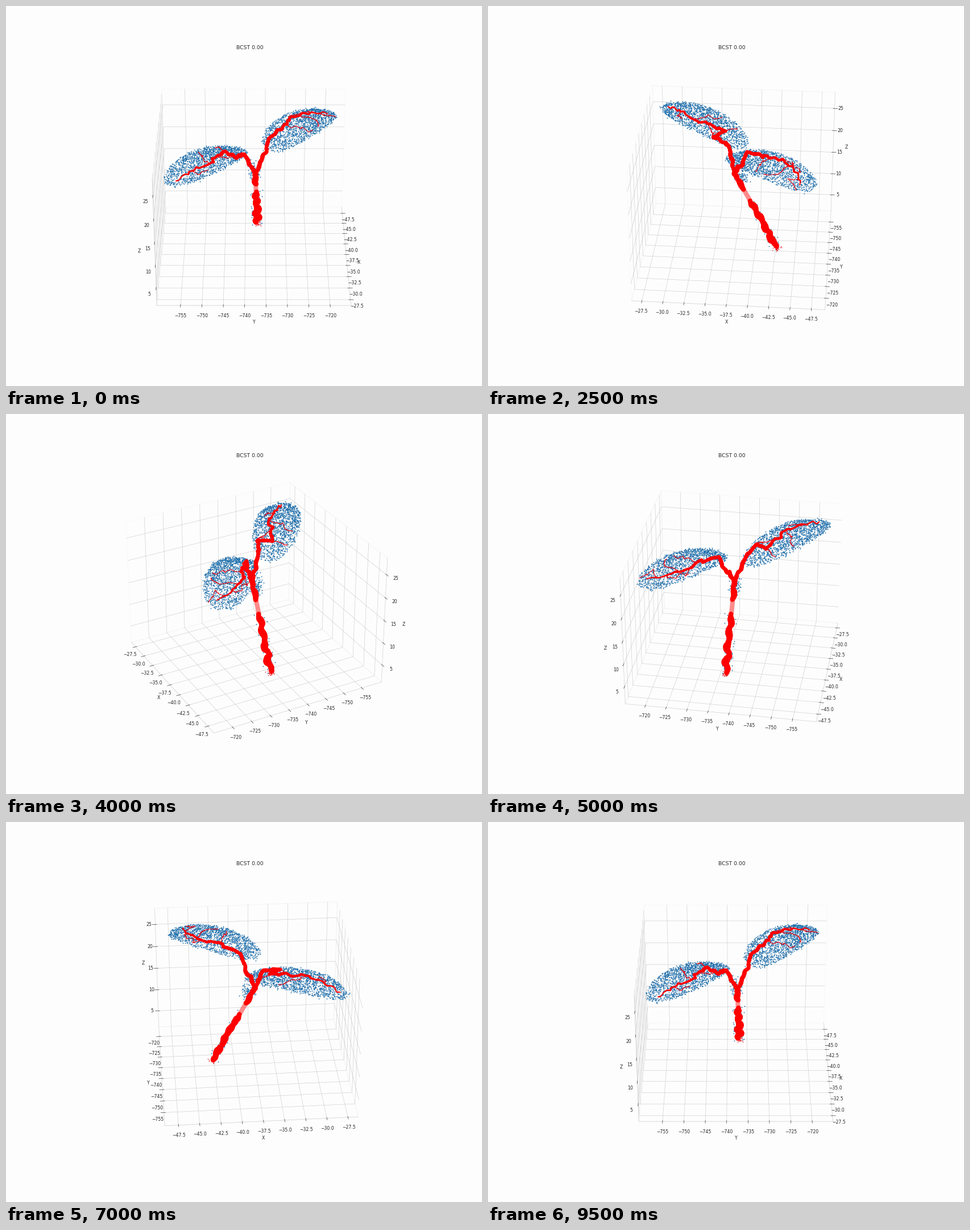
A matplotlib script that plays this animation: 837x669 px, repeating every 10000 ms.

```python
import numpy as np
import matplotlib.pyplot as plt
from matplotlib.animation import FuncAnimation

WIDTH, HEIGHT, DPI = 837, 669, 55.8
FRAMES, INTERVAL = 20, 500
BACKGROUND = "#fdfdfd"
EPS = 1e-6  # keeps the pixel size from rounding down

# Plot box; shapes are modelled in centred box units and mapped to data.
LOW = np.array([-49.10, -760.56, 1.13])
HIGH = np.array([-26.28, -715.13, 28.59])
BOX = np.array([4, 4, 3]) * 0.29762

HUB = np.array([0.007, 0.010, 0.152])
FOOT = np.array([-0.266, 0.019, -0.375])
GAP = 0.21, 0.36  # bare stretch, as fractions of the stem

plt.rcParams.update({
    "font.family": "DejaVu Sans",
    "text.color": "0.15",
    "axes.labelcolor": "0.15",
    "axes.edgecolor": "0.8",
    "grid.color": "0.8",
    "xtick.color": "0.15",
    "ytick.color": "0.15",
})

rng = np.random.default_rng(7)


def to_data(points):
    return (LOW + HIGH) / 2 + np.asarray(points) * (HIGH - LOW) / BOX


def scatter_area(diameter):
    """Scatter size for a diameter in pixels."""
    return (np.asarray(diameter) * 72 / DPI) ** 2


def resample(points, step):
    """Even samples along a polyline."""
    points = np.asarray(points, float)
    lengths = np.linalg.norm(np.diff(points, axis=0), axis=1)
    s = np.r_[0, np.cumsum(lengths)]
    t = np.linspace(0, s[-1], int(s[-1] / step) + 2)
    return np.stack([np.interp(t, s, c) for c in points.T], axis=1)


def rough(line, every, amount):
    """Add jagged random offsets that vanish at both ends."""
    knots = max(4, len(line) // every)
    offsets = rng.normal(0, amount, (knots, 3))
    offsets[[0, -1]] = 0
    t = np.linspace(0, knots - 1, len(line))
    return line + np.stack([np.interp(t, range(knots), c) for c in offsets.T], axis=1)


class Leaf:
    """Shallow dome over an ellipse; p runs from base to tip, q across."""

    def __init__(self, centre, length, width, heading, height, rise, rib):
        angle = np.radians(heading)
        self.centre = np.array(centre)
        self.along = length * np.array([np.cos(angle), np.sin(angle)])
        self.across = width * np.array([abs(np.sin(angle)), abs(np.cos(angle))])
        self.height, self.rise = height, rise
        self.rib = np.array(rib)

    def at(self, pq):
        p, q = np.transpose(pq)
        flat = self.centre + np.outer(p, self.along) + np.outer(q, self.across)
        w = self.height + self.rise * p - 0.055 * p**2 - 0.012 * q**2
        return np.column_stack([flat, w])

    def cloud(self, count):
        radius = np.sqrt(rng.uniform(0, 1, count))
        angle = rng.uniform(0, 2 * np.pi, count)
        points = self.at(np.column_stack([radius * np.cos(angle),
                                          radius * np.sin(angle)]))
        return points + rng.normal(0, 0.005, points.shape)

    def main_rib(self):
        """Stalk and midrib, thinning from the hub to the tip."""
        path = np.vstack([HUB, self.at(resample(self.rib, 0.05))])
        line = rough(resample(path, 0.004), 6, 0.006)
        return line, 7.5 - 5.5 * np.linspace(0, 1, len(line)) ** 1.4

    def side_veins(self, count):
        """Thin branches leaving the midrib on alternating sides."""
        rib = resample(self.rib, 0.02)
        for k in range(count):
            start = rib[int(len(rib) * (k + 2) / (count + 2)) - 1]
            end = np.array([start[0] + rng.uniform(-0.3, 0.2),
                            0.75 * (-1) ** k * np.sqrt(1 - start[0] ** 2)])
            bend = (start + end) / 2 + rng.normal(0, 0.12, 2)
            yield rough(resample(self.at([start, bend, end]), 0.0035), 7, 0.007)


right_leaf = Leaf((-0.235, 0.287), 0.334, 0.156, 142.8, 0.386, 0.003,
                  [(-.71, -.35), (-.23, -.32), (.08, -.54), (.59, -.14), (.78, .25)])
left_leaf = Leaf((0.230, -0.290), 0.356, 0.145, -37.4, 0.380, 0.030,
                 [(-.78, .45), (-.47, .70), (-.52, 0), (.08, .40), (.85, .10)])
leaves = right_leaf, left_leaf


def stem_at(t):
    return HUB + np.outer(t, FOOT - HUB)


def stem_piece(start, end):
    """Knotty stretch of stem with swellings, tapering at the foot."""
    t = np.arange(start, end, 0.006)
    line = stem_at(t)
    line[:, 1] += 0.011 * np.sin(12 * np.pi * t) * t
    diameter = 9 + 2.5 * t + 1.6 * np.cos(14 * np.pi * (t - 0.71))
    return rough(line, 5, 0.004), diameter * np.clip((1.06 - t) / 0.12, 0.5, 1)


def dots(ax, points, diameter, color, zorder):
    ax.scatter(*to_data(points).T, s=scatter_area(diameter), c=color, linewidths=0,
               depthshade=False, zorder=zorder)


pieces = [stem_piece(0, GAP[0]), stem_piece(GAP[1], 1)]
pieces += [leaf.main_rib() for leaf in leaves]
neck = rng.normal((-.035, 0, .14), (.02, .02, .035), (90, 3))
fringe = stem_at(rng.uniform(GAP[1], 1, 70)) + rng.normal(0, 0.016, (70, 3))
foot_specks = FOOT + rng.normal(0, 0.013, (30, 3))
cloud = np.vstack([leaf.cloud(1600) for leaf in leaves] + [neck, fringe])
specks = np.vstack([vein for leaf in leaves for vein in leaf.side_veins(5)]
                   + [foot_specks])

fig = plt.figure(figsize=((WIDTH + EPS) / DPI, (HEIGHT + EPS) / DPI), dpi=DPI,
                 facecolor=BACKGROUND)
ax = fig.add_subplot(projection="3d", computed_zorder=False, facecolor=BACKGROUND)

dots(ax, cloud, 1.8, "#1f6fab", 2)
dots(ax, specks, 1.5, "#e0101c", 3)
ax.plot(*to_data(stem_at(GAP)).T, color="red", alpha=0.45, lw=8 * 72 / DPI,
        solid_capstyle="round", zorder=4)
for line, diameter in pieces:
    dots(ax, line, diameter * rng.uniform(0.82, 1.1, len(line)), "red", 5)

ax.set(xlim=(LOW[0], HIGH[0]), ylim=(LOW[1], HIGH[1]), zlim=(LOW[2], HIGH[2]),
       yticks=range(-755, -715, 5),
       xlabel="X", ylabel="Y", zlabel="Z", title="BCST 0.00")
for axis in (ax.xaxis, ax.yaxis, ax.zaxis):
    axis.pane.fill = False


def update(i):
    # The tiny offset keeps the side panes well defined at a frontal view.
    ax.view_init(elev=30, azim=0.01 + 360 * i / (FRAMES - 1))
    return []


anim = FuncAnimation(fig, update, frames=FRAMES, init_func=lambda: update(0),
                     interval=INTERVAL, repeat=True, repeat_delay=0)
plt.show()
```
